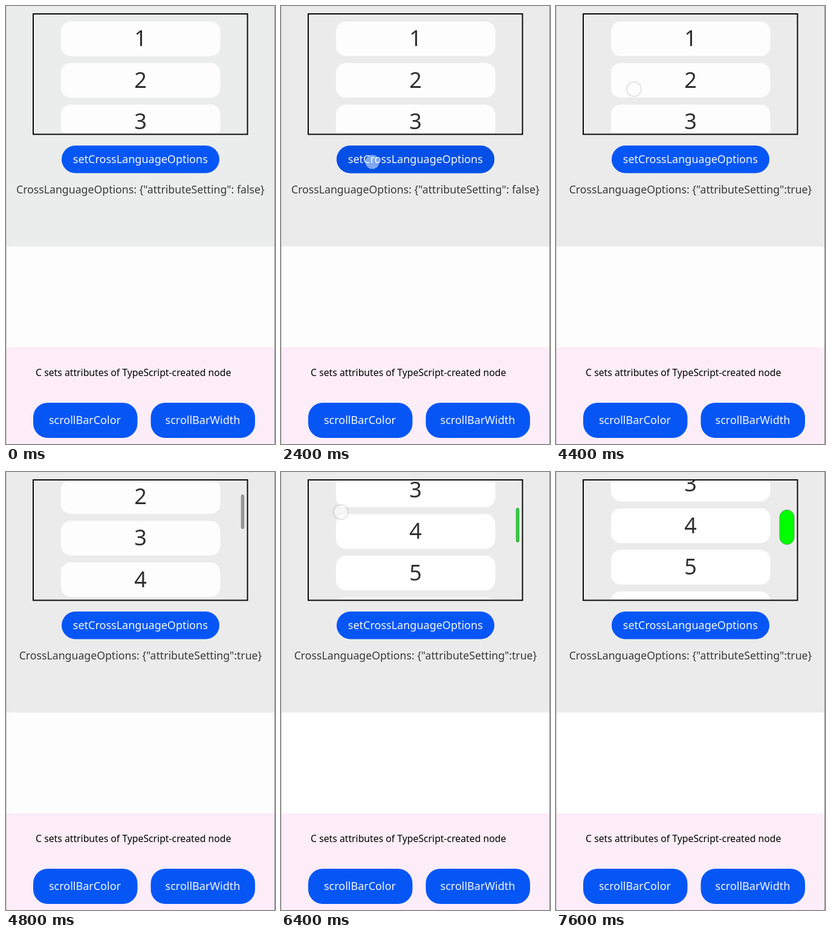
Recreate the animation shown at these times as an HTML page. Size 445 by 722 pixels, loop 8 s.

```html
<!DOCTYPE html>
<html lang="en">
<head>
<meta charset="utf-8">
<title>Scroll bar attributes</title>
<style>
  html, body { margin: 0; width: 100%; height: 100%; overflow: hidden; background: #fdfdfd; }
  svg { display: block; width: 445px; height: 722px; }
  text { font-family: "Noto Sans", "Open Sans", sans-serif; text-anchor: middle; }

  /* Every change is a hard cut on a 400 ms grid: 5% of the loop. */
  .a { animation: 8s step-end infinite; }

  .panel { fill: #ebedec; animation-name: panel; }
  .paper { fill: #fdfdfd; animation-name: paper; }
  .num { font-size: 36px; fill: #303030; }
  .btn { fill: #0656f6; }
  .label { font-size: 18px; fill: #f4f8ff; }
  .state { font-size: 17.7px; fill: #3a3a3a; }
  .note { font-size: 15.75px; fill: #000; }

  .press-set { animation-name: press-set; }
  .press-color { animation-name: press-color; }
  .press-width { animation-name: press-width; }
  .off { animation-name: off; }
  .on { animation-name: on; }
  .list { animation-name: scroll; }
  .bar { animation-name: bar; }
  .thin { animation-name: thin; }
  .wide { fill: #0f0; stroke: #3c7a3c; stroke-width: .6; animation-name: wide; }
  .touch { fill: #fff; fill-opacity: .5; }
  .ring { stroke: #000; stroke-opacity: .11; stroke-width: 2; }
  .finger { animation-name: finger; }

  @keyframes panel { 0% { fill: #ebedec } 25%, 100% { fill: #ebebeb } }
  @keyframes paper { 0% { fill: #fdfdfd } 75%, 100% { fill: #fff } }
  @keyframes press-set { 0%, 35%, 100% { opacity: 0 } 25% { opacity: 1 } }
  @keyframes press-color { 0%, 70%, 100% { opacity: 0 } 65% { opacity: 1 } }
  @keyframes press-width { 0%, 95%, 100% { opacity: 0 } 90% { opacity: 1 } }
  @keyframes off { 0% { opacity: 1 } 35%, 100% { opacity: 0 } }
  @keyframes on { 0% { opacity: 0 } 35%, 100% { opacity: 1 } }
  @keyframes scroll {
    0% { transform: none }
    60% { transform: translateY(-82px) }
    80% { transform: translateY(-161.5px) }
    85%, 100% { transform: translateY(-171px) }
  }
  @keyframes bar {
    0% { transform: none }
    60% { transform: translateY(23px) }
    80% { transform: translateY(45px) }
    85%, 100% { transform: translateY(48px) }
  }
  @keyframes thin {
    0%, 95%, 100% { opacity: 0; fill: #999; stroke: #999 }
    60% { opacity: 1; fill: #999; stroke: #8a8a8a }
    70% { opacity: 1; fill: #20ee20; stroke: #123c12 }
    80% { opacity: 1; fill: #20dc2c; stroke: #2c9a34 }
  }
  @keyframes wide { 0% { opacity: 0 } 95%, 100% { opacity: 1 } }
  @keyframes finger {
    0%, 60%, 85%, 100% { opacity: 0; transform: translate(129px, 137px) }
    55% { opacity: 1; transform: translate(129px, 137px) }
    75% { opacity: 1; transform: translate(116px, 153px) }
    80% { opacity: 1; transform: translate(99px, 66px) }
  }
</style>
</head>
<body>
<svg viewBox="0 0 445 722">
  <defs>
    <clipPath id="view"><rect x="46" y="14" width="353" height="196"/></clipPath>
    <rect id="card" x="91" y="25.5" width="263.5" height="57" rx="16"/>
    <rect id="pill" width="261" height="45.5" rx="22.7"/>
    <rect id="key" width="172.5" height="58" rx="24"/>
  </defs>

  <rect class="a paper" width="445" height="722"/>
  <rect class="a panel" width="445" height="396.5"/>
  <rect y="562.5" width="445" height="160" fill="#fcedf8"/>

  <g clip-path="url(#view)">
    <g class="a list">
      <g class="a paper">
        <use href="#card"/>
        <use href="#card" y="68.5"/>
        <use href="#card" y="137"/>
        <use href="#card" y="205.5"/>
        <use href="#card" y="274"/>
        <use href="#card" y="342.5"/>
      </g>
      <g class="num">
        <text x="222.5" y="66">1</text>
        <text x="222.5" y="134.5">2</text>
        <text x="222.5" y="203">3</text>
        <text x="222.5" y="271.5">4</text>
        <text x="222.5" y="340">5</text>
        <text x="222.5" y="408.5">6</text>
      </g>
    </g>
    <g class="a bar">
      <rect class="a thin" x="389.2" y="14.5" width="4.4" height="56" rx="2.2"/>
      <rect class="a wide" x="370" y="14.5" width="24" height="57" rx="12"/>
    </g>
  </g>
  <rect x="45" y="13" width="354.5" height="198.5" fill="none" stroke="#0a0a0a" stroke-width="2"/>

  <g class="btn">
    <use href="#pill" x="92" y="230"/>
    <use href="#key" x="45" y="654"/>
    <use href="#key" x="239.5" y="654"/>
  </g>
  <g fill="#0450e6">
    <use class="a press-set" href="#pill" x="92" y="230"/>
    <use class="a press-color" href="#key" x="45" y="654"/>
    <use class="a press-width" href="#key" x="239.5" y="654"/>
  </g>
  <g class="label">
    <text x="222.3" y="258.8">setCrossLanguageOptions</text>
    <text x="130.5" y="689.3">scrollBarColor</text>
    <text x="325.5" y="689.3">scrollBarWidth</text>
  </g>

  <g class="state">
    <text class="a off" x="222.3" y="309">CrossLanguageOptions: {"attributeSetting": false}</text>
    <text class="a on" x="222.5" y="309">CrossLanguageOptions: {"attributeSetting":true}</text>
  </g>
  <text class="note" x="210.7" y="610">C sets attributes of TypeScript-created node</text>

  <g class="touch">
    <circle class="a press-set" cx="151" cy="257" r="11.5"/>
    <circle class="a press-color" cx="131" cy="690" r="11.5"/>
    <circle class="a press-width" cx="326" cy="690" r="11.5"/>
    <circle class="a finger ring" r="12"/>
  </g>

  <rect width="1" height="722" fill="#c4c4c4"/>
  <rect x="444" width="1" height="722" fill="#8c8c8c"/>
</svg>
</body>
</html>
```
